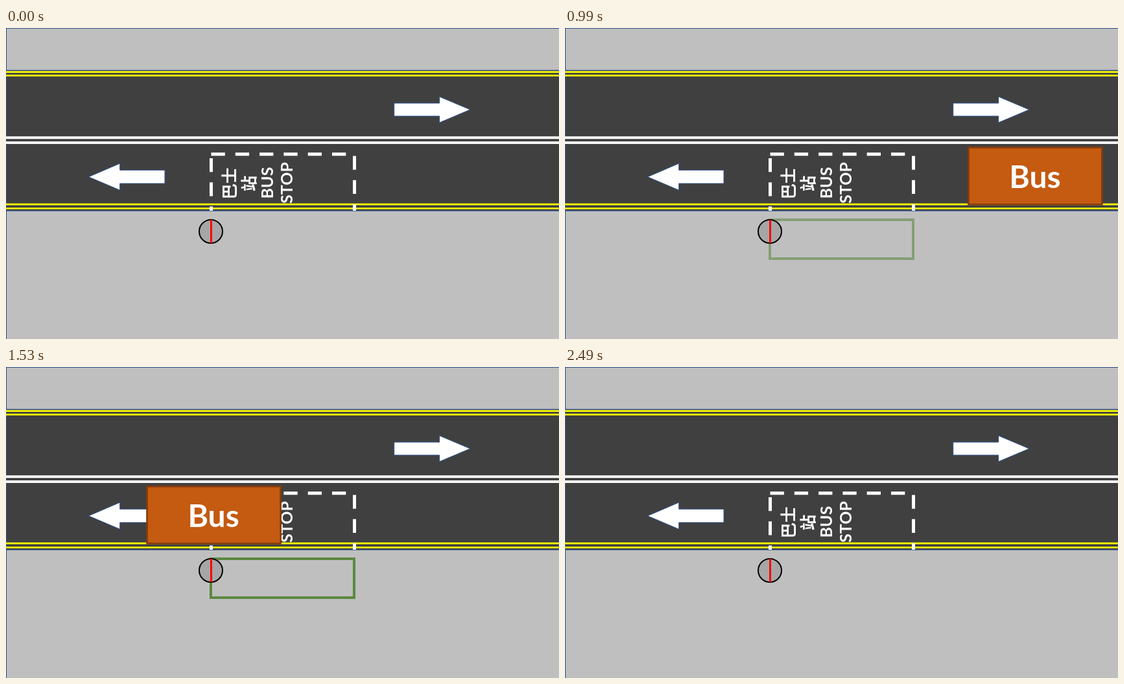
These frames come from a looping animation (853 by 480 pixels, 2.89 s). An HTML page:

```html
<!DOCTYPE html>
<html lang="en">
<head>
<meta charset="utf-8">
<title>Bus stop</title>
<style>
  html, body { margin: 0; width: 100%; height: 100%; overflow: hidden; background: #bfbfbf; }
  svg { display: block; width: 853px; height: 480px; }
  text { fill: #fff; font-weight: 700; text-anchor: middle; font-family: Lato, sans-serif; }
  .sign text { font-size: 25px; }
  .sign .cjk { font-family: "Noto Sans CJK TC", "Noto Sans CJK SC", "Noto Sans CJK", sans-serif; font-size: 24.5px; }
  .edge { fill: none; stroke: #2f528f; stroke-width: 1.33; }
  .yellow { stroke: #ff0; stroke-width: 2.7; }
  .white { stroke: #fff; stroke-width: 4; }
  .arrow { fill: #fff; stroke: #2f528f; stroke-width: 1; }
  .dash { fill: none; stroke: #fff; stroke-width: 5; stroke-dasharray: 21.3 16; }
</style>
</head>
<body>
<svg viewBox="0 0 853 480">
  <rect width="853" height="480" fill="#bfbfbf"/>
  <rect y="65" width="853" height="217" fill="#404040"/>
  <path class="edge" d="M853 .4H.4V480M0 65.3H853M0 282.2H853"/>
  <path class="yellow" d="M0 67.9H853M0 73.4H853M0 272.2H853M0 278.5H853"/>
  <path class="white" d="M0 169.2H853M0 177H853"/>
  <path class="arrow" d="M598.7 116H668.7V106L716 126L668.7 146V136H598.7Z"/>
  <path class="arrow" d="M245 219.3H175.7V209L127.5 229.8L175.7 250.3V240H245Z"/>
  <path class="dash" d="M316.5 194.7H537.5V282M316.5 201V282"/>
  <g class="sign">
    <text class="cjk" transform="translate(354 240) rotate(-90)">巴士</text>
    <text class="cjk" transform="translate(384 240) rotate(-90)">站</text>
    <text transform="translate(412 239) rotate(-90)">BUS</text>
    <text transform="translate(442 239) rotate(-90)">STOP</text>
  </g>
  <rect id="zone" x="316" y="296" width="221" height="60" fill="none" stroke="#548235" stroke-width="4"/>
  <circle cx="316" cy="314" r="18" fill="#a6a6a6" stroke="#000" stroke-width="2"/>
  <path d="M316.5 296V332" stroke="#f00" stroke-width="3"/>
  <g id="bus">
    <rect x="1" y="184.4" width="206" height="88" fill="#c55a11" stroke="#843c0c" stroke-width="2.7"/>
    <text x="103.5" y="247" font-size="48">Bus</text>
  </g>
</svg>
<script>
  const LOOP = 2890, START = 330, END = 2490, STEP = 60;
  const bus = document.getElementById('bus');
  const zone = document.getElementById('zone');
  const clamp = (v, a, b) => Math.min(b, Math.max(a, v));
  const ramp = (t, from, to) => clamp((t - from) / (to - from), 0, 1);

  // Smooth start and end, a little quicker through the middle
  function busX(step) {
    const a = clamp((step - 17.75) * Math.PI / 36, -Math.PI / 2, Math.PI / 2);
    return 323 - 532.5 * Math.sin(a) - 3.6 * Math.sin(4 * a);
  }

  function draw(t) {
    const moving = t >= START && t < END;
    const step = Math.floor((t - START) / STEP);
    const now = START + step * STEP;
    bus.setAttribute('visibility', moving ? 'visible' : 'hidden');
    bus.setAttribute('transform', `translate(${busX(step).toFixed(2)} 0)`);
    zone.setAttribute('opacity', moving ? ramp(now, 750, 1200) * (1 - ramp(now, 1450, 2430)) : 0);
  }

  const begin = performance.now();
  function tick() {
    draw((performance.now() - begin) % LOOP);
    requestAnimationFrame(tick);
  }
  tick();
</script>
</body>
</html>
```
